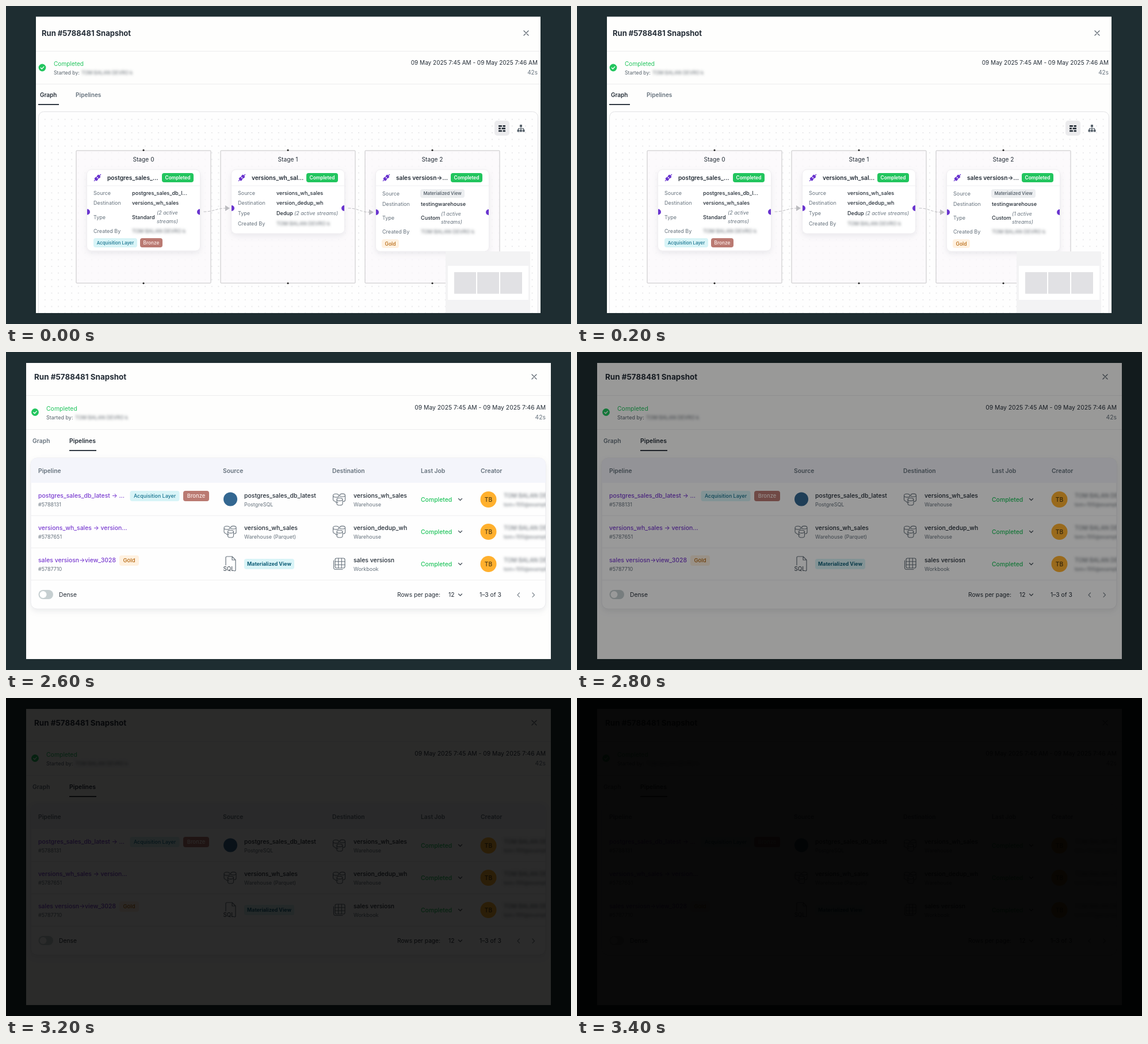
An HTML page that plays this animation: 982x552 px, repeating every 3800 ms.

```html
<!DOCTYPE html>
<html lang="en">
<head>
<meta charset="utf-8">
<title>Run snapshot</title>
<style>
html, body { margin: 0; width: 100%; height: 100%; overflow: hidden; background: #1e2d31; }
svg { display: block; width: 100%; height: 100%; font-family: Inter, "Open Sans", sans-serif; white-space: pre; }
</style>
</head>
<body>
<svg id="stage" viewBox="0 0 982 552"></svg>
<script>
const INK = '#232c36', GRAY = '#66727d', GREEN = '#22c55e', PURPLE = '#6a35cf', LINE = '#ececee';

// Text is placed by its vertical centre.
const text = (x, y, s, size, fill = INK, weight = 400, extra = '') =>
  `<text x="${x}" y="${y + size * .36}" font-size="${size}" fill="${fill}" font-weight="${weight}" ${extra}>${s}</text>`;
const MID = 'text-anchor="middle"', END = 'text-anchor="end"', ITALIC = 'font-style="italic"';
const rect = (x, y, w, h, fill, r = 0, extra = '') =>
  `<rect x="${x}" y="${y}" width="${w}" height="${h}" rx="${r}" fill="${fill}" ${extra}/>`;
const circle = (x, y, r, fill) => `<circle cx="${x}" cy="${y}" r="${r}" fill="${fill}"/>`;
const path = (d, stroke, width = 1, extra = '') =>
  `<path d="${d}" fill="none" stroke="${stroke}" stroke-width="${width}" stroke-linecap="round" stroke-linejoin="round" ${extra}/>`;
const rule = (x1, x2, y, color = LINE, w = 1) => rect(x1, y, x2 - x1, w, color);
const at = (x, y, body) => `<g transform="translate(${x} ${y})">${body}</g>`;
const chip = (x, y, w, h, s, size, bg, fill, weight = 600) =>
  rect(x, y, w, h, bg, 4) + text(x + w / 2, y + h / 2, s, size, fill, weight, MID);
const blurred = (x, y, s, size, fill = '#7c8288') => text(x, y, s, size, fill, 500, 'filter="url(#blur)"');
const chevron = (x, y) => path(`M${x - 3} ${y - 1.5}l3 3l3 -3`, '#4b555f', 1.3);

const acquisition = (x, y, w, h, size) => chip(x, y, w, h, 'Acquisition Layer', size, '#d8f4f7', '#17738f', 500);
const bronze = (x, y, w, h, size) => chip(x, y, w, h, 'Bronze', size, '#ba7a72', '#fdeeea', 500);
const gold = (x, y, w, h, size) => chip(x, y, w, h, 'Gold', size, '#fff1e0', '#b5670f', 500);

function header(o) {
  const { left, right, top, k } = o;
  return rect(left, top, right - left, 533 - top, '#fefefd')
    + text(o.titleX, o.titleY, 'Run #5788481 Snapshot', 13 * k, INK, 700)
    + path(`M${o.closeX - 4} ${o.titleY - 4}l8 8m0 -8l-8 8`, '#58626c', 1.2)
    + rule(left, right, o.rule1) + rule(left, right, o.rule2)
    + circle(o.checkX, o.checkY, 6.4, GREEN)
    + path(`M${o.checkX - 2.7} ${o.checkY + .2}l2 2l3.5 -3.8`, '#fff', 1.4)
    + text(o.textX, o.doneY, 'Completed', 10.1 * k, GREEN)
    + text(o.textX, o.byY, 'Started by:', 8.7 * k, '#56616b')
    + blurred(o.nameX, o.byY, 'TOM BALAN DEVRO k', 8.5 * k)
    + text(o.endX, o.doneY - 1.3, '09 May 2025 7:45 AM - 09 May 2025 7:46 AM', 10 * k, INK, 400, END)
    + text(o.endX, o.byY, '42s', 10 * k, GRAY, 400, END)
    + text(o.tabs[0], 154, 'Graph', 10 * k, o.active ? GRAY : INK, 600)
    + text(o.tabs[1], 154, 'Pipelines', 10.1 * k, o.active ? INK : GRAY, 600)
    + rect(o.bar[0], 170, o.bar[1] - o.bar[0], 2, '#333b44');
}

const plug = (x, y) => at(x, y, `<g transform="rotate(45)">
  ${rect(-3, -5.2, 6, 4.4, PURPLE, 1.5)}${rect(-3, 1, 6, 4.4, PURPLE, 1.5)}
  ${path('M0 -8v3M0 5v3M-1.6 -1v2M1.6 -1v2', PURPLE, 1.3)}</g>`);

function stage(i, name, rows, height, handleY) {
  const x = 122 + i * 251, card = x + 18.5;
  const half = (px, sweep) => `<path d="M${px} ${handleY - 5}a5 5 0 0 ${sweep} 0 10z" fill="${PURPLE}"/>`;
  return rect(x, 251, 234, 230, '#fbf8fb', 1, 'fill-opacity=".75" stroke="#c5c4c6"')
    + circle(x + 117, 250.3, 1.5, '#222') + circle(x + 117, 481.3, 1.5, '#222')
    + text(x + 117, 266, 'Stage ' + i, 10.2, INK, 400, MID)
    + rect(card, 284, 197, height, '#fff', 8, 'stroke="#efedf0" filter="url(#shadow)"')
    + rule(card, card + 197, 311.5, '#efeff1')
    + plug(x + 37, 298) + text(x + 54, 298, name, 10.2, INK, 600)
    + chip(x + 149, 290, 55, 16, 'Completed', 8.3, GREEN, '#fff')
    + half(card + .5, 1) + half(card + 196.5, 0)
    + rows.map(([y, label, value]) =>
        text(x + 30, y, label, 9, GRAY) + (value ? text(x + 97, y, value, 9.15, INK, 450) : '')).join('');
}

function graphView() {
  const stream = (x, y, s) => text(x, y, s, 8.9, GRAY, 400, ITALIC);
  const person = (x, y) => blurred(x, y, 'TOM BALAN DEVRO k', 8.9);
  const arrow = (x1, y1, x2, y2) =>
    path(`M${x1} ${y1}C${x1 + 18} ${y1} ${x2 - 24} ${y2} ${x2 - 6} ${y2}`, '#bcbcc0', 1, 'stroke-dasharray="4 3"')
    + `<path d="M${x2} ${y2}l-8 -5v10z" fill="#bcbcc0"/>`;
  return header({
      left: 52, right: 929, top: 18.5, k: 1, titleX: 62, titleY: 47, closeX: 904, rule1: 78, rule2: 135,
      checkX: 63, checkY: 107, textX: 83, doneY: 100, byY: 115.5, nameX: 131, endX: 924, tabs: [59, 121], bar: [56, 92], active: 0
    })
    + `<g clip-path="url(#panel)">`
    + rect(56.5, 183.5, 868, 380, '#fefefe', 9, 'stroke="#e2e2e5"')
    + rect(60, 190, 860, 343, 'url(#dots)')
    + rect(849, 199, 26, 26, '#ebebed', 5)
    + [207, 211.3, 215.6].map((y, i) => rect(856, y, i == 1 ? 4 : 6, 2.7, INK, .6) + rect(i == 1 ? 861.5 : 863.5, y, i == 1 ? 6.5 : 4.5, 2.7, INK, .6)).join('')
    + path('M895 210v3M890.5 215v-2.5h9v2.5M895 212v3', '#56616b', 1.1)
    + rect(893, 206, 4, 4, '#56616b', .5)
    + [888.5, 893, 897.8].map(x => rect(x, 214.5, 3.8, 4, '#56616b', .5)).join('')
    + stage(0, 'postgres_sales_...', [[325, 'Source', 'postgres_sales_db_l...'], [342, 'Destination', 'versions_wh_sales'],
        [366.5, 'Type', 'Standard'], [390.5, 'Created By']], 141, 357.5)
    + stream(262, 359, '(2 active') + stream(262, 373.5, 'streams)') + person(219, 390.5)
    + acquisition(152, 403, 76, 16, 7.8) + bronze(233, 403, 39, 16, 8.3)
    + stage(1, 'versions_wh_sal...', [[325, 'Source', 'versions_wh_sales'], [342, 'Destination', 'version_dedup_wh'],
        [359.5, 'Type', 'Dedup'], [377.5, 'Created By']], 111, 351)
    + stream(501, 359.5, '(2 active streams)') + person(470, 377.5)
    + stage(2, 'sales versiosn→...', [[325.5, 'Source'], [343.5, 'Destination', 'testingwarehouse'],
        [368, 'Type', 'Custom'], [391.5, 'Created By']], 142, 358)
    + chip(720, 318, 77, 15, 'Materialized View', 7.7, '#eceef0', '#59646e')
    + stream(756, 361, '(1 active') + stream(756, 375, 'streams)') + person(721, 391.5)
    + gold(653, 405, 30, 15, 8.5)
    + arrow(344, 357, 389, 351) + arrow(595, 351, 639, 358)
    + rect(764, 426, 147, 107, '#f3f3f4') + rect(768, 451, 140, 59, '#fff')
    + [779, 819, 859].map(x => rect(x, 462, 38, 37.5, '#e1e1e4')).join('')
    + '</g>';
}

const store = (x, y) => at(x, y, path(
  'M-2 5h-3c-1.5 0 -1.5 -2 -3 -2.3c-2 -.5 -2.5 -1 -2.5 -2.5v-7c0 -4 10 -4 10 0v1.5M-10.5 -6.5c0 3 7 3.2 9 1.7' +
  'M1 -7c0 -3.8 9.5 -3.8 9.5 0v8c0 1.5 -1 2.3 -3 2.6M1 -7c0 3 9.5 3 9.5 0' +
  'M-4 0c0 -3.6 10 -3.6 10 0v7.5c0 3.4 -10 3.4 -10 0zM-4 0c0 3.2 10 3.2 10 0', '#68737d', 1.1));
const sqlFile = (x, y) => at(x, y, path('M-8 2v-13c0 -1.3 .8 -2 2 -2h9l6 6v17c0 1.4 -.8 2 -2 2M3 -13v6h6', '#68737d', 1.2)
  + text(-12.5, 8, 'SQL', 9.8, '#4b555f', 500));
const workbook = (x, y) => at(x, y,
  rect(-7, -10, 17, 17, 'none', 2.5, 'stroke="#68737d" stroke-width="1.2"')
  + path('M-7 -4.3h17M-7 1.3h17M-1.3 -10v17M4.3 -10v17M-9.5 -6v12c0 2.5 1 3.5 3.5 3.5h12', '#68737d', 1.1));

function tableRow(y, link, id, source, sourceNote, dest, destNote) {
  const pair = (x, a, b, color = INK) => text(x, y - 6.5, a, 10.45, color, 450) + text(x, y + 8.8, b, 9, GRAY);
  return pair(56, link, id, '#793bd0')
    + (source ? pair(414, source, sourceNote) : '') + pair(604, dest, destNote)
    + text(721, y, 'Completed', 10.4, GREEN, 450) + chevron(789.5, y)
    + circle(838.5, y, 14, '#ffb02e') + text(838.5, y, 'TB', 10.2, '#503a12', 500, MID)
    + blurred(865, y - 7, 'TOM BALAN DEVRO', 10) + blurred(865, y + 9, 'tom+100@example.com', 8.5)
    + rule(43, 938, y + 27.5, '#f0f0f2');
}

function pipelinesView() {
  const heads = { 56: 'Pipeline', 377: 'Source', 567: 'Destination', 721: 'Last Job', 825: 'Creator' };
  return header({
      left: 35, right: 947, top: 19, k: 1.035, titleX: 49, titleY: 43, closeX: 918, rule1: 75, rule2: 134,
      checkX: 50.5, checkY: 104.5, textX: 70, doneY: 98, byY: 113.5, nameX: 120, endX: 938, tabs: [46, 110], bar: [110, 157], active: 1
    })
    + rect(43, 184, 895, 262, '#fefefe', 11, 'stroke="#e9e9ed" filter="url(#shadow)"')
    + '<g clip-path="url(#table)">'
    + rect(43, 184, 895, 43, '#f4f5fb')
    + Object.entries(heads).map(([x, s]) => text(x, 206, s, 10.3, GRAY, 600)).join('')
    + tableRow(256, 'postgres_sales_db_latest → ...', '#5788131', 'postgres_sales_db_latest', 'PostgreSQL', 'versions_wh_sales', 'Warehouse')
    + tableRow(312, 'versions_wh_sales → version...', '#5787651', 'versions_wh_sales', 'Warehouse (Parquet)', 'version_dedup_wh', 'Warehouse')
    + tableRow(368, 'sales versiosn→view_3028', '#5787710', '', '', 'sales versiosn', 'Workbook')
    + acquisition(215.5, 241, 86, 18, 8.9) + bronze(308, 241, 45, 18, 9.4) + gold(197, 353, 34, 18, 9.5)
    + circle(390, 255.5, 12, '#336791') + store(389.5, 312) + sqlFile(390, 368)
    + chip(414, 359, 87, 18, 'Materialized View', 8.8, '#d9f4f7', '#0f5f78', 700)
    + store(579, 256) + store(579, 312) + workbook(579, 368)
    + rect(56.5, 413, 25.5, 16, '#c6cfd1', 8) + circle(64.5, 421, 6, '#fff')
    + text(92, 421, 'Dense', 10.3) + text(680, 421.5, 'Rows per page:', 10.2)
    + text(769, 421.5, '12', 10.3) + chevron(789.5, 421.5) + text(823, 421.5, '1–3 of 3', 10.3)
    + path('M892.5 418l-3.5 3.7l3.5 3.7M915 418l3.5 3.7l-3.5 3.7', '#848d95', 1.3)
    + '</g>';
}

stage0 = document.getElementById('stage');
stage0.innerHTML = `<defs>
  <filter id="blur" x="-10%" y="-60%" width="120%" height="220%"><feGaussianBlur stdDeviation="1.9"/></filter>
  <filter id="shadow" x="-10%" y="-10%" width="120%" height="125%"><feDropShadow dx="0" dy="4" stdDeviation="5" flood-color="#8c93a0" flood-opacity=".16"/></filter>
  <pattern id="dots" x="62" y="191" width="11.6" height="11.6" patternUnits="userSpaceOnUse"><circle cx="5.8" cy="5.8" r=".65" fill="#c2c2c6"/></pattern>
  <clipPath id="panel"><rect x="52" y="18" width="877" height="515"/></clipPath>
  <clipPath id="table"><rect x="43" y="184" width="895" height="262" rx="11"/></clipPath>
</defs>
${rect(0, 0, 982, 552, '#1e2d31')}
<g id="graph">${graphView()}</g><g id="pipelines">${pipelinesView()}</g>
<rect id="shade" width="982" height="552" fill="#000"/>`;

const [graph, pipelines, shade] = ['graph', 'pipelines', 'shade'].map(id => document.getElementById(id));
const LIGHT = [1, .6, .37, .17, .035];
const start = performance.now();

function frame() {
  const t = (performance.now() - start) % 3800;
  const step = Math.min(4, Math.max(0, Math.floor((t - 2600) / 200)));
  graph.style.display = t < 1200 ? '' : 'none';
  pipelines.style.display = t < 1200 ? 'none' : '';
  shade.setAttribute('opacity', 1 - LIGHT[step]);
  requestAnimationFrame(frame);
}
frame();
</script>
</body>
</html>
```
